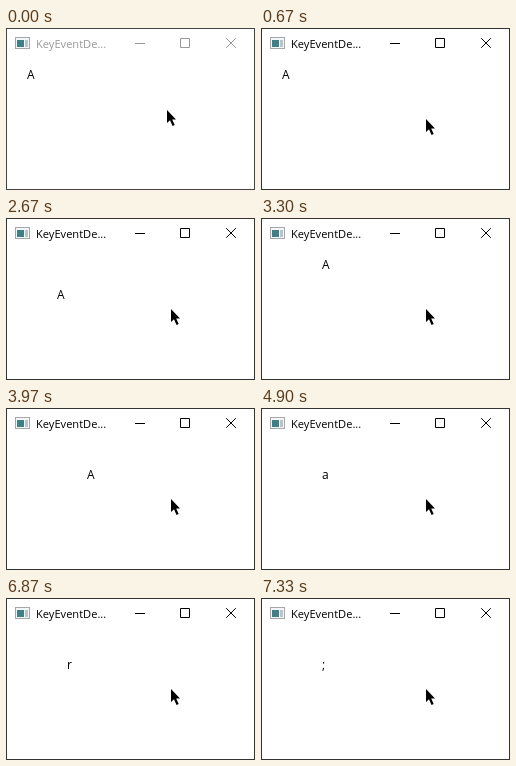
These frames come from a looping animation (249 by 162 pixels, 8 s). An HTML page:

```html
<!DOCTYPE html>
<html lang="en">
<head>
<meta charset="utf-8">
<title>Key events</title>
<style>
  html, body { margin: 0; width: 100%; height: 100%; overflow: hidden; background: #fff; }
  svg { display: block; width: 249px; height: 162px; font: 12px "Open Sans", "Noto Sans", sans-serif; }
  #title { font-size: 11.1px; }
  .crisp { shape-rendering: crispEdges; }
</style>
</head>
<body>
<svg viewBox="0 0 249 162">
  <rect width="249" height="162" fill="#fff"/>
  <rect id="border" x=".5" y=".5" width="248" height="161" fill="none" stroke="#444"/>
  <g class="crisp">
    <rect x="9" y="9" width="15" height="12" fill="#a4a8ab"/>
    <rect x="10" y="10" width="13" height="10" fill="#f4f6f7"/>
    <rect x="11" y="12" width="7" height="7" fill="#3f7f86"/>
    <rect x="19" y="12" width="3" height="7" fill="#b9c3c8"/>
  </g>
  <g id="bar" color="#999">
    <text id="title" x="30" y="20" fill="currentColor">KeyEventDe...</text>
    <g fill="none" stroke="currentColor">
      <path d="M129 15.5h10M174.5 10.5h9v9h-9z"/>
      <path d="M220.2 10.2l9.6 9.6M229.8 10.2l-9.6 9.6"/>
    </g>
  </g>
  <text id="letter">A</text>
  <path id="cursor" d="M0 0V13L3 10.2L5.5 16L7.7 15L5.2 9.4H9Z"/>
</svg>
<script>
const LOOP = 8000, STEP = 10;
const $ = id => document.getElementById(id);

// Arrow-key presses: time, then direction
const moves = [
  [1730, 'D'], [1900, 'D'], [2100, 'D'],
  [2330, 'R'], [2470, 'R'], [2670, 'R'], [2770, 'R'],
  [2970, 'U'], [3100, 'U'], [3300, 'U'],
  [3500, 'R'], [3670, 'R'],
  [3830, 'D'], [3970, 'D'],
  [4170, 'L'], [4470, 'L']
];
const dirs = { U: [0, -1], D: [0, 1], L: [-1, 0], R: [1, 0] };

// Typed characters replace the letter
const keys = [
  [0, 'A'], [4900, 'a'], [5130, 's'], [5430, 'd'], [5630, 'f'], [6400, 'j'],
  [6670, 'o'], [6730, 'w'], [6800, 'e'], [6870, 'r'],
  [7030, 'q'], [7100, 'e'], [7170, 'w'], [7330, ';']
];

function draw(t) {
  const past = ([time]) => t >= time;
  let x = 21, y = 51;
  for (const [, d] of moves.filter(past)) {
    x += STEP * dirs[d][0];
    y += STEP * dirs[d][1];
  }
  const letter = $('letter');
  letter.setAttribute('x', x);
  letter.setAttribute('y', y);
  letter.textContent = keys.filter(past).pop()[1];

  const active = t >= 670;
  $('bar').setAttribute('color', active ? '#000' : '#999');
  $('border').setAttribute('stroke', active ? '#333' : '#444');
  $('cursor').setAttribute('transform', t < 30 ? 'translate(161 82)' : 'translate(165 91)');
}

function tick() {
  draw(performance.now() % LOOP);
  requestAnimationFrame(tick);
}
draw(0);
requestAnimationFrame(tick);
</script>
</body>
</html>
```
